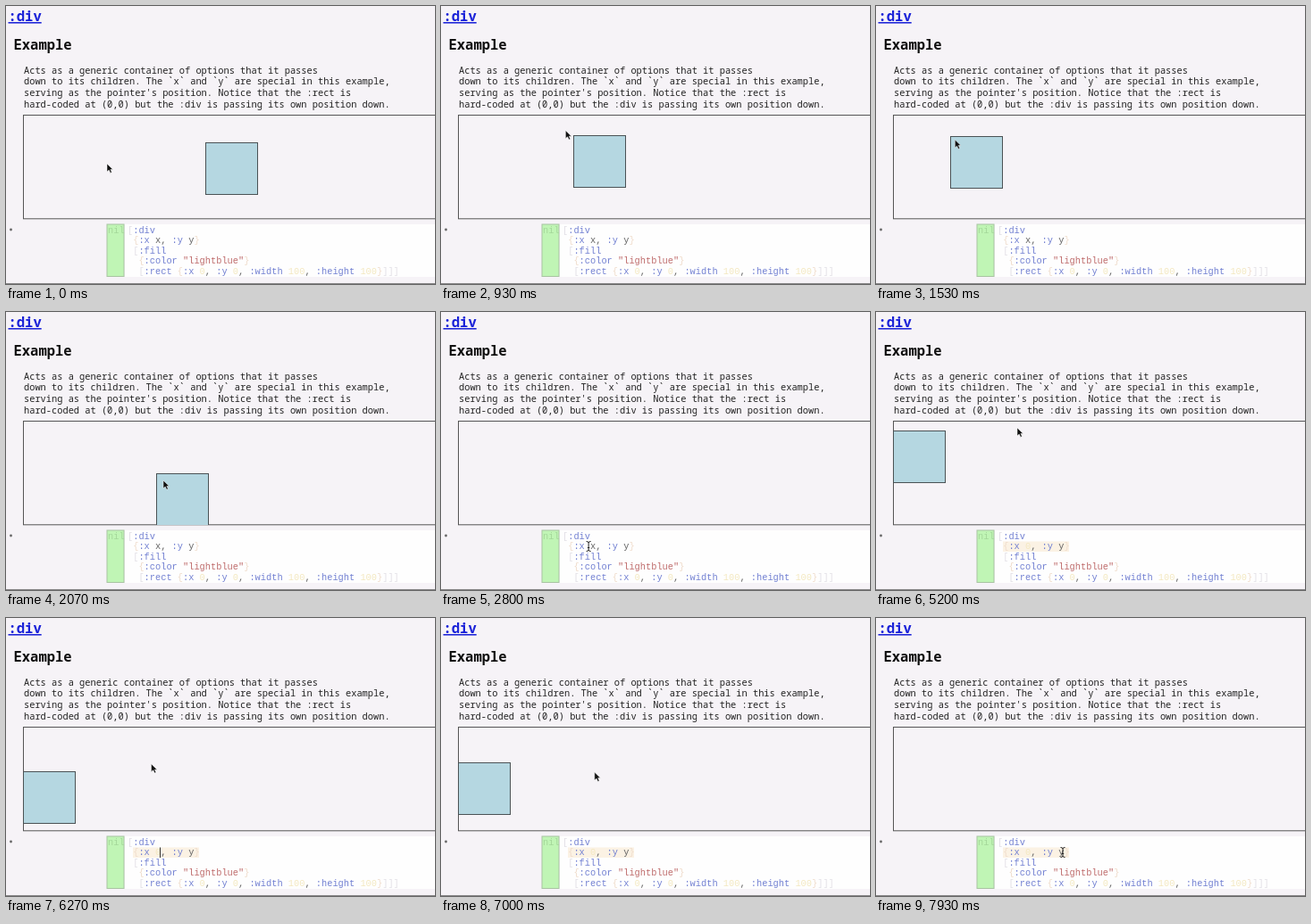
Recreate the animation shown at these times as an HTML page. Size 480 by 312 pixels, loop 8000 ms.

```html
<!DOCTYPE html>
<html lang="en">
<meta charset="utf-8">
<title>:div example</title>
<style>
  html, body { margin: 0; width: 100%; height: 100%; overflow: hidden; background: #f6f3f7; }
  svg { display: block; }
  text { font: 10.35px "Noto Sans Mono", monospace; fill: #222; }
  .title { font-size: 15.5px; font-weight: 600; fill: #111; }
  .link { fill: #1a22d8; text-decoration: underline; }
  .code text { font: 10.33px "Liberation Mono", monospace; }
  .code .key { fill: #7280d2; }
  .code .str { fill: #bf6c6c; }
  .code .num { fill: #f3e8c0; }
  .code .sym { fill: #666; }
  .code .brace { fill: #efdccb; }
  .code .bracket { fill: #e2e0e6; }
</style>
<svg width="480" height="312" viewBox="0 0 480 312">
  <clipPath id="canvas"><rect x="19" y="122" width="461" height="117"/></clipPath>
  <text class="title link" x="2.5" y="17">:div</text>
  <text class="title" x="8.5" y="49">Example</text>
  <g id="prose"></g>
  <rect x="19.5" y="122.5" width="470" height="116.3" fill="none" stroke="#555"/>
  <g clip-path="url(#canvas)">
    <rect id="box" width="58" height="58" fill="#b5d7e1" stroke="#4a5255"/>
  </g>
  <circle cx="5.5" cy="251" r="1.4" fill="#666"/>
  <rect x="133" y="245" width="347" height="59" fill="#fefefe"/>
  <rect x="113" y="245" width="19" height="58.5" fill="#c0f5b5" stroke="#a8c4a2"/>
  <path d="M0 311.5H480" stroke="#888"/>
  <rect id="form" x="142" y="257.5" width="74" height="11.5" fill="#fbf2e4"/>
  <rect id="selection" x="166" y="257.5" width="6.5" height="11.5" fill="#a9c4ee"/>
  <g id="code" class="code"><text x="114" y="254.6" style="fill:#a4d89a">nil</text></g>
  <path id="caret" d="M172.5 257.5V269" stroke="#333"/>
  <path id="arrow" d="M0 0V9L2.2 7.1L3.8 10.4L5.4 9.6L3.9 6.5H6.6Z" fill="#111" stroke="#fff" stroke-width=".5"/>
  <path id="beam" d="M-2.5 -5.5Q0 -5.5 0 -4Q0 -5.5 2.5 -5.5M0 -4V4M-2.5 5.5Q0 5.5 0 4Q0 5.5 2.5 5.5M-1.2 1.5H1.2" fill="none" stroke="#222"/>
</svg>
<script>
const $ = id => document.getElementById(id);
const FRAME = 200 / 3, LOOP = 8000;

function addText(parent, x, y, content, className = "") {
  const el = document.createElementNS("http://www.w3.org/2000/svg", "text");
  el.setAttribute("x", x);
  el.setAttribute("y", y);
  el.setAttribute("class", className);
  el.textContent = content;
  return parent.appendChild(el);
}

[
  "Acts as a generic container of options that it passes",
  "down to its children. The `x` and `y` are special in this example,",
  "serving as the pointer's position. Notice that the :rect is",
  "hard-coded at (0,0) but the :div is passing its own position down."
].forEach((line, i) => addText($("prose"), 20, 75.7 + i * 12.75, line));

function tokenClass(token) {
  if (token[0] === ":") return "key";
  if (token[0] === '"') return "str";
  if (/\d/.test(token)) return "num";
  if (/[{}]/.test(token)) return "brace";
  return /[\[\]]/.test(token) ? "bracket" : "sym";
}

let xValue;
[
  "[:div",
  " {:x x, :y y}",
  " [:fill",
  '  {:color "lightblue"}',
  "  [:rect {:x 0, :y 0, :width 100, :height 100}]]]"
].forEach((line, row) => {
  for (const m of line.matchAll(/:\w+|"\w+"|\d+|\w+|[{}]|[\[\]]+|,/g)) {
    const el = addText($("code"), 136 + m.index * 6.2, 254.6 + row * 11.6, m[0], tokenClass(m[0]));
    if (m[0] === "x") xValue = el;
  }
});

// Turning points of the pointer: time, x, y
const turns = [
  [0, 190, 259], [600, 190, 259],
  // sweep to the upper left and back
  [867, 149, 146], [1100, 117, 132], [1433, 83, 145], [2067, 176, 189],
  // down to the code
  [2200, 182, 222], [2267, 180, 288], [2467, 165, 263], [4400, 169, 263], [4533, 187, 281],
  // up and down beside the pinned box
  [5200, 158, 130], [5913, 162, 196], [6593, 163, 135], [7100, 175, 189],
  // back to the code
  [7400, 190, 290], [7933, 209, 263], [LOOP, 209, 263]
];

const slope = (i, k) => (turns[i + 1][k] - turns[i][k]) / (turns[i + 1][0] - turns[i][0]);

// Zero at every reversal, so the curve never overshoots
function tangent(i, k) {
  if (i === 0 || i === turns.length - 1) return 0;
  const a = slope(i - 1, k), b = slope(i, k);
  return a * b > 0 ? 2 * a * b / (a + b) : 0;
}

function pointer(t) {
  const i = turns.findIndex(p => p[0] > t) - 1;
  const span = turns[i + 1][0] - turns[i][0], u = (t - turns[i][0]) / span, v = 1 - u;
  return [1, 2].map(k =>
    turns[i][k] * v * v * (1 + 2 * u) + turns[i + 1][k] * u * u * (3 - 2 * u) +
    span * u * v * (tangent(i, k) * v - tangent(i + 1, k) * u));
}

const show = (id, on) => $(id).setAttribute("visibility", on ? "visible" : "hidden");
const place = (id, x, y) => $(id).setAttribute("transform", `translate(${x} ${y})`);

function draw(now) {
  const t = Math.floor((now % LOOP + 4) / FRAME) * FRAME % LOOP;
  const typed = t > 4130;
  const [x, y] = t < 1 ? [113, 177] : pointer(t);
  // The box follows one step behind the pointer
  const [boxX, boxY] = t < 730 ? [224, 154] : pointer(t - FRAME);
  const overCode = y > 244;

  place("box", typed ? 19.5 : Math.round(boxX) - .5, Math.round(boxY) - .5);
  place("arrow", x, y);
  place("beam", x, y);
  show("arrow", !overCode);
  show("beam", overCode && !(typed && t < 4460));
  show("form", t > 3190);
  show("selection", t > 3390 && !typed);
  show("caret", typed && (t - 4145 + 1060) % 1060 < 530);

  const value = typed ? "0" : "x";
  if (xValue.textContent !== value) {
    xValue.textContent = value;
    xValue.setAttribute("class", tokenClass(value));
  }
}

const start = performance.now();
function tick() {
  draw(performance.now() - start);
  requestAnimationFrame(tick);
}
tick();
</script>
</html>
```
